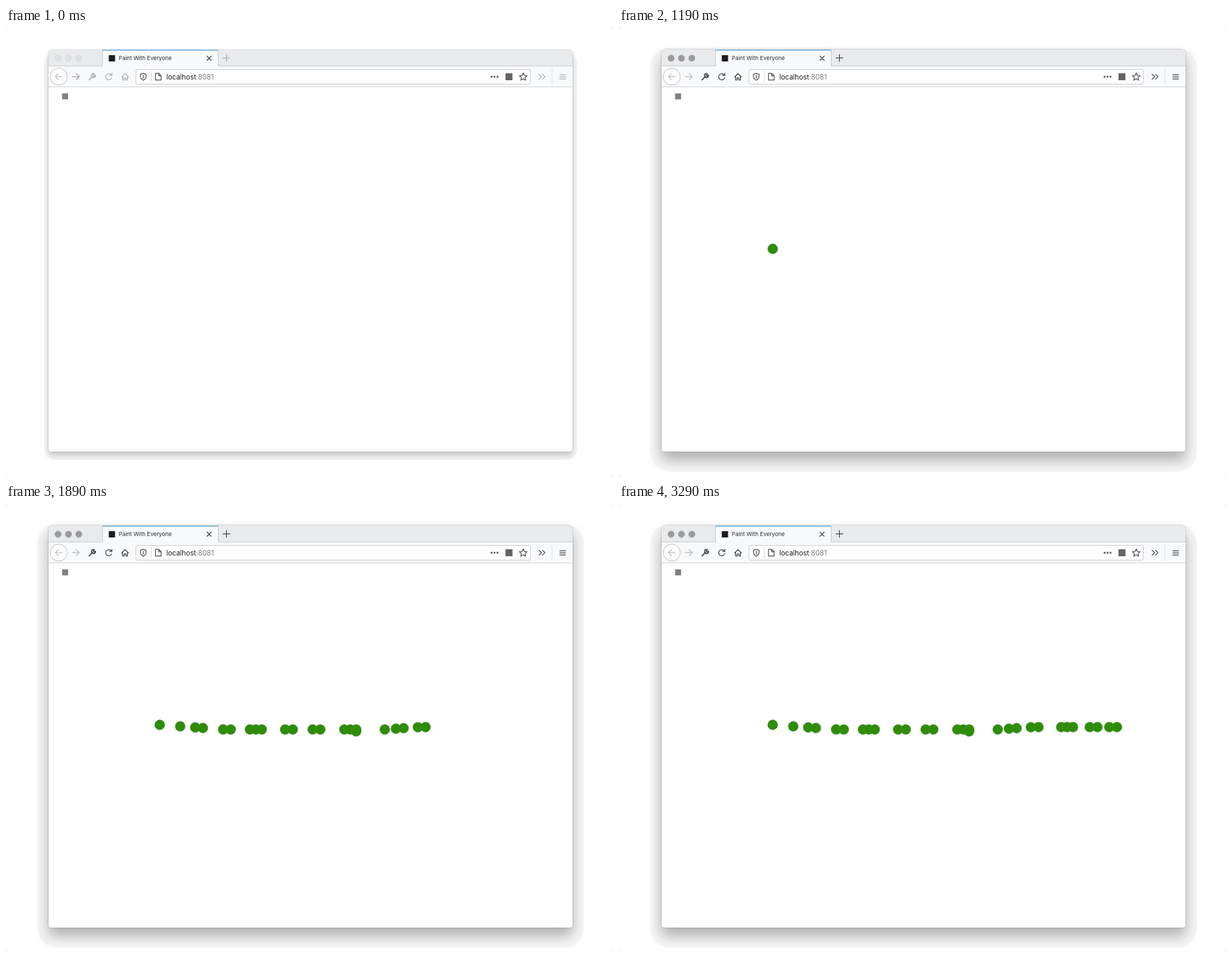
An HTML page that plays this animation: 871x643 px, repeating every 3.5 s.

```html
<!DOCTYPE html>
<html lang="en">
<head>
<meta charset="utf-8">
<title>Shared canvas</title>
<style>
html, body { margin: 0; width: 100%; height: 100%; overflow: hidden; background: #fff; }
#stage { position: relative; width: 871px; height: 643px; overflow: hidden; }
#stage::before {
  content: ""; position: absolute; inset: 36px 51px 23px 55px;
  border-radius: 16px; background: rgba(0,0,0,.035);
}
#stage.active::before { inset: 28px 42px 6px 45px; border-radius: 28px; }
#window {
  position: absolute; left: 61px; top: 31px; width: 752px; height: 577px;
  border-radius: 5px 5px 4px 4px; background: #fff;
  box-shadow: 0 0 0 .6px rgba(0,0,0,.15), 0 6px 8px rgba(0,0,0,.19);
}
.active #window {
  box-shadow: 0 0 0 .6px rgba(0,0,0,.2), 0 12px 19px rgba(0,0,0,.29);
}
svg { position: absolute; left: 0; top: 0; }
text { font-family: Inter, Roboto, sans-serif; }
.icon { fill: none; stroke-width: 1.25; stroke-linecap: round; stroke-linejoin: round; }
.tool { stroke: #b0b1b3; }
.active .tool { stroke: #4b4c4f; }
.forward { stroke: #a3a4a6; }
.active .forward { stroke: #bcbdbf; }
.field { stroke: #58595c; }
#lights { fill: #dfe0e2; stroke: #d4d5d7; stroke-width: .7; }
.active #lights { fill: #9b9b9c; stroke: #8f8f90; }
</style>
</head>
<body>
<div id="stage">
<div id="window"></div>
<svg width="871" height="643" viewBox="0 0 871 643">
  <path fill="#bbb" d="M0 0h1v1h-1zM870 0h1v1h-1zM0 642h1v1h-1zM870 642h1v1h-1z"/>

  <!-- tab strip -->
  <path fill="#e9eaec" d="M61 55V36a5 5 0 0 1 5-5H808a5 5 0 0 1 5 5V55z"/>
  <path fill="#cfd0d2" d="M61 54H813v1H61z"/>
  <g id="lights"></g>
  <path fill="#f7f9fb" d="M139 31H304V55H139z"/>
  <path fill="#cbccce" d="M138 32h1v23h-1zM304 32h1v23h-1z"/>
  <path fill="#74b3e2" d="M138.5 31h166v1.5h-166z"/>
  <rect x="147.5" y="39" width="9" height="9" fill="#1d1d1f"/>
  <text x="161.8" y="46.3" font-size="8" fill="#2b2b2d">Paint With Everyone</text>
  <path class="icon" stroke="#3a3a3c" d="M288.4 40.4l6 6m0-6l-6 6"/>
  <path class="icon tool" d="M311.5 42.9h9.8M316.4 38v9.8"/>

  <!-- toolbar -->
  <path fill="#f8f9fb" d="M61 55H813V84H61z"/>
  <path fill="#d6d7d9" d="M61 84H813v1H61z"/>
  <circle cx="75.7" cy="69.8" r="12.2" fill="#fdfdfe" stroke="#bcbdbf" stroke-width=".9"/>
  <path class="icon" stroke="#c3c4c6" d="M81 69.8H70.8m4.4-4.4l-4.4 4.4l4.4 4.4"/>
  <path class="icon forward" d="M95 69.8h10.2m-4.4-4.4l4.4 4.4l-4.4 4.4"/>
  <g class="icon tool">
    <path stroke-width="1.8" d="M119.3 74.3l4.6-4.6"/>
    <path stroke-width="1.6" d="M126.8 65.6a2.9 2.9 0 1 0 1.6 2.1l-2 1.2l-1.3-1.4z"/>
    <path d="M151 67.3a4.4 4.4 0 1 0 .6 4.1M151.9 65v3.2h-3.2"/>
    <path d="M166 70.2l4.8-4.8l4.8 4.8M167.3 69.4v5.1h2.3v-2.9h2.4v2.9h2.3v-5.1"/>
    <path d="M765 66.4l3.5 3.5l-3.5 3.5M769.8 66.4l3.5 3.5l-3.5 3.5"/>
    <path d="M794.7 67h8.2m-8.2 3h8.2m-8.2 3h8.2"/>
  </g>
  <path fill="#e2e3e5" d="M783 58h1v24h-1z"/>

  <!-- address field -->
  <rect x="186.5" y="59.5" width="566" height="21" rx="2.5" fill="#fff" stroke="#cfd0d2"/>
  <path fill="#dcdddf" d="M208 62h1v16h-1z"/>
  <g class="icon field">
    <path d="M197 65.2l4 1.1v2.8c0 2.8-1.5 4.8-4 5.8c-2.5-1-4-3-4-5.8v-2.8z"/>
    <path d="M197 67.8v4.2"/>
    <path d="M214.5 65.2h4.8l3.3 3.3v6.2h-8.1zM219 65.4v3.3h3.4"/>
    <path id="star"/>
  </g>
  <g id="more" fill="#58595c"></g>
  <rect x="716.7" y="65" width="10" height="10" fill="#636467"/>
  <text x="230" y="74" font-size="10" fill="#1c1c1e">localhost<tspan fill="#7b7c7f">:8081</tspan></text>

  <!-- page -->
  <rect x="80.5" y="93.8" width="8.6" height="8.6" fill="#808080"/>
  <g id="dots" fill="#2f8c08" stroke="#45963a" stroke-width=".5"></g>
</svg>
</div>
<script>
const LOOP = 3500, STEP = 70, ACTIVATE = 420;
const $ = id => document.getElementById(id);

// A stroke drifts from its start height to a level one, leaving bursts of dots.
const strokes = [
  { begin: 1190, end: 1540, from: [220.6, 317], level: [312, 323.6],
    lead: [220.6, 250], bursts: [277, 317, 358.5, 406, 445.5, 494] },
  { begin: 1680, end: 2100, from: [502.4, 326.4], level: [593, 320.2],
    lead: [502.4, 543.5], bursts: [565, 596.5, 643, 681, 709] }
];

function circle(parent, cx, cy, r) {
  const c = document.createElementNS(parent.namespaceURI, "circle");
  c.setAttribute("cx", cx);
  c.setAttribute("cy", cy);
  c.setAttribute("r", r);
  parent.append(c);
  return c;
}

for (let i = 0; i < 3; i++) {
  circle($("lights"), 74.7 + i * 14.9, 43.4, 4.4);
  circle($("more"), 696.8 + i * 4.2, 70, 1.4);
}

const starPoints = Array.from({ length: 10 }, (_, i) => {
  const r = i % 2 ? 2.7 : 5.8, a = i * Math.PI / 5;
  return (742.2 + r * Math.sin(a)).toFixed(2) + " " + (70.3 - r * Math.cos(a)).toFixed(2);
});
$("star").setAttribute("d", "M" + starPoints.join("L") + "z");

// Bursts hold 2, 2, 3 dots in turn; three sit closer together than two.
function burst(center, i) {
  const n = i % 3 === 2 ? 3 : 2, gap = 16 - 2.5 * n;
  return Array.from({ length: n }, (_, k) => center + (k - (n - 1) / 2) * gap);
}

function strokeDots({ begin, end, from: [x0, y0], level: [x1, y1], lead, bursts }) {
  const xs = [...lead, ...bursts.flatMap(burst)];
  const steps = (end - begin) / STEP, length = xs.at(-1) - x0;
  return xs.map(x => {
    const y = y0 + (y1 - y0) * Math.min(1, (x - x0) / (x1 - x0));
    const step = Math.ceil((x - x0) / length * steps);
    return { time: begin + step * STEP, el: circle($("dots"), x, y, 7.2) };
  });
}

const dots = strokes.flatMap(strokeDots);
const start = performance.now();

function draw(now) {
  const t = Math.max(0, now - start) % LOOP;
  $("stage").classList.toggle("active", t >= ACTIVATE);
  for (const { time, el } of dots) el.style.display = t >= time ? "" : "none";
  requestAnimationFrame(draw);
}
draw(start);
</script>
</body>
</html>
```
